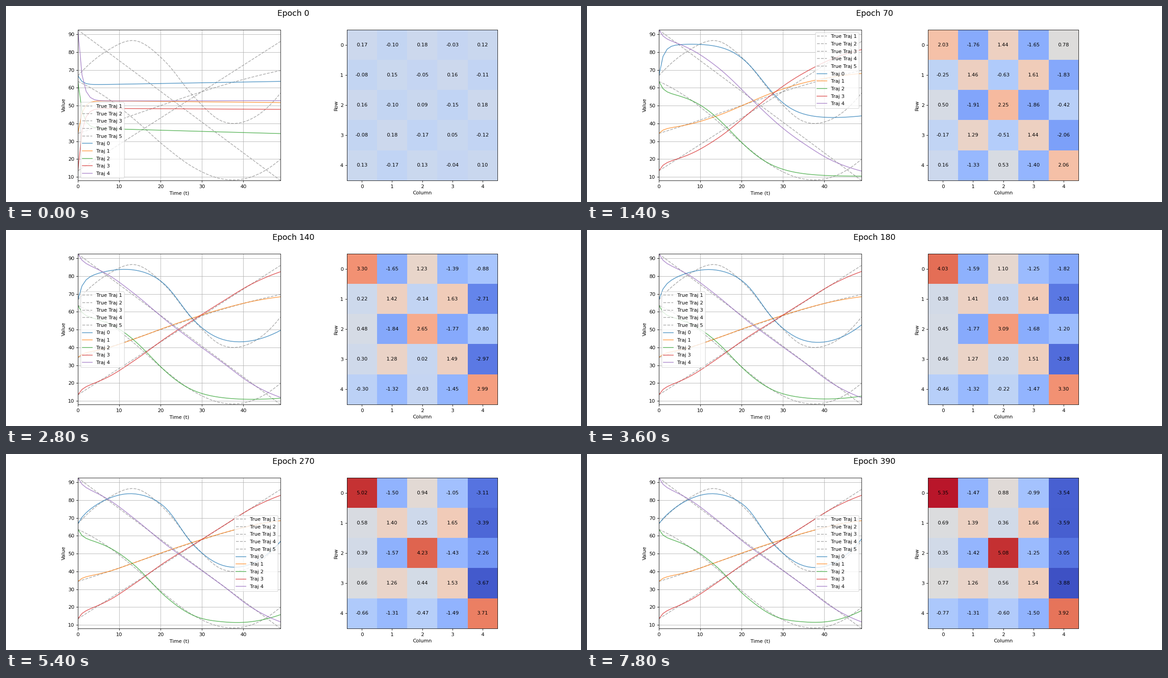
A matplotlib script that plays this animation: 1280 px wide and 437 px high, repeating every 8 s.

```python
import numpy as np
import matplotlib.pyplot as plt
from matplotlib.animation import FuncAnimation

FRAMES = 40
STEP = 10                    # epochs per frame
WARMUP, LAST = 30, 390       # epochs
T = np.arange(50)


def smooth(*values):
    """Cubic curve over T through evenly spaced values."""
    y = np.array(values)
    x = np.linspace(0, 49, len(y))
    h = x[1]
    m = np.gradient(y, h, edge_order=2)
    i = np.minimum((T / h).astype(int), len(y) - 2)
    u = (T - x[i]) / h
    return ((1 + 2 * u) * (1 - u) ** 2 * y[i] + u * (1 - u) ** 2 * h * m[i]
            + u * u * (3 - 2 * u) * y[i + 1] + u * u * (u - 1) * h * m[i + 1])


def sigmoid(first, last, middle, width):
    return first + (last - first) / (1 + np.exp((middle - T) / width))


def progress(epoch, tau, power):
    """Learning after the warm-up, from 0 to 1 at the last epoch."""
    def learned(e):
        return 1 - np.exp(-(max(e - WARMUP, 0) / tau) ** power)
    return learned(epoch) / learned(LAST)


def learn(epoch, start, early, late, pace):
    """Grow from start to early, then settle towards late."""
    grown = start + (early - start) * min(epoch / WARMUP, 1)
    return grown + (late - early) * progress(epoch, *pace)


TRUE = [
    smooth(66.8, 80.7, 86.4, 75.0, 55.2, 41.1, 42.6, 57.0),
    smooth(34.4, 39.6, 45.2, 50.8, 56.3, 61.4, 65.9, 69.7),
    smooth(63.6, 54.4, 41.6, 27.2, 15.3, 8.8, 10.0, 19.9),
    np.linspace(13.4, 86.0, 50),
    np.linspace(92.5, 8.0, 50),
]

# Per trajectory: untrained line, shape after warm-up, final shape, pace
CURVES = [
    (np.linspace(61.6, 63.6, 50), sigmoid(85.2, 42.8, 25.1, 3.7),
     smooth(67.6, 80.1, 83.5, 76.3, 54.6, 43.2, 44.4, 58.1), (150, 1.8)),
    (np.linspace(52.8, 51.7, 50), sigmoid(37.0, 67.5, 22.2, 5.4),
     smooth(36.7, 39.7, 45.2, 51.1, 56.5, 61.5, 65.7, 68.5), (40, 1)),
    (np.linspace(37.5, 34.3, 50), sigmoid(59.0, 10.2, 17.8, 5.1),
     smooth(59.0, 54.2, 42.6, 26.0, 14.9, 11.7, 12.3, 18.0), (230, 2.5)),
    (np.linspace(48.5, 47.9, 50), sigmoid(17.5, 79.8, 23.2, 5.5),
     smooth(17.2, 23.2, 33.6, 45.1, 55.1, 65.3, 75.4, 82.7), (40, 1)),
    (np.linspace(52.6, 52.8, 50), sigmoid(89.0, 15.3, 23.1, 5.6),
     smooth(88.0, 80.9, 69.0, 55.6, 43.8, 32.1, 19.8, 11.7), (40, 1)),
]

# Weights: small checkered noise, then two learned states
checker = (-1) ** np.add.outer(range(5), range(5))
W_START = checker * np.random.default_rng(4).uniform(0.02, 0.18, (5, 5))
W_EARLY = np.array([[1.70, -1.79, 1.50, -1.71, 1.20],
                    [-0.68, 1.49, -1.09, 1.58, -1.01],
                    [0.50, -1.92, 2.21, -1.87, -0.39],
                    [-0.61, 1.31, -1.01, 1.40, -1.22],
                    [0.59, -1.34, 1.06, -1.36, 1.20]])
W_LATE = np.array([[5.35, -1.47, 0.88, -0.99, -3.54],
                   [0.69, 1.39, 0.36, 1.66, -3.59],
                   [0.35, -1.42, 5.08, -1.25, -3.05],
                   [0.77, 1.26, 0.56, 1.54, -3.88],
                   [-0.77, -1.31, -0.60, -1.50, 3.92]])
W_PACE = [(150, 1.8), (110, 1), (230, 2.5), (110, 1), (110, 1)]

LEGEND_SPOTS = [(0, "lower left"), (20, "center right"), (50, "upper right"),
                (110, "center left"), (190, "center right")]

fig, (ax, grid_ax) = plt.subplots(1, 2, figsize=(16, 5.4625), dpi=80)
fig.subplots_adjust(top=0.878)
title = fig.suptitle("Epoch 0", fontsize=16, y=0.982)

for k, y in enumerate(TRUE, 1):
    ax.plot(T, y, "--", color="gray", alpha=0.6, label=f"True Traj {k}")
lines = [ax.plot(T, y, color=f"C{k}", alpha=0.7, label=f"Traj {k}")[0]
         for k, y in enumerate(TRUE)]
ax.set(xlim=(0, 49), ylim=(8, 92.5), xlabel="Time (t)", ylabel="Value")
ax.grid(True)
legend = ax.legend(loc="lower left", labelspacing=0.6)

image = grid_ax.imshow(W_START, cmap="coolwarm", vmin=-4, vmax=5.5)
grid_ax.set(xticks=range(5), yticks=range(5), xlabel="Column", ylabel="Row")
cells = [[grid_ax.text(c, r, "", ha="center", va="center") for c in range(5)]
         for r in range(5)]
for axes in (ax, grid_ax):
    axes.tick_params(axis="x", pad=4.5)


def update(frame):
    epoch = frame * STEP
    title.set_text(f"Epoch {epoch}")
    for line, true, curve in zip(lines, TRUE, CURVES):
        slow = learn(epoch, *curve)
        line.set_ydata(slow + (true[0] - slow[0]) * np.exp(-T))
    legend.set_loc([spot for first, spot in LEGEND_SPOTS if epoch >= first][-1])

    weights = [learn(epoch, *row) for row in zip(W_START, W_EARLY, W_LATE, W_PACE)]
    image.set_data(weights)
    for row, values in zip(cells, weights):
        for cell, value in zip(row, values):
            cell.set_text(f"{value:.2f}")
    return [title, legend, image, *lines]


anim = FuncAnimation(fig, update, frames=FRAMES, interval=1000 * 8 / FRAMES,
                     repeat=True)
plt.show()
```
